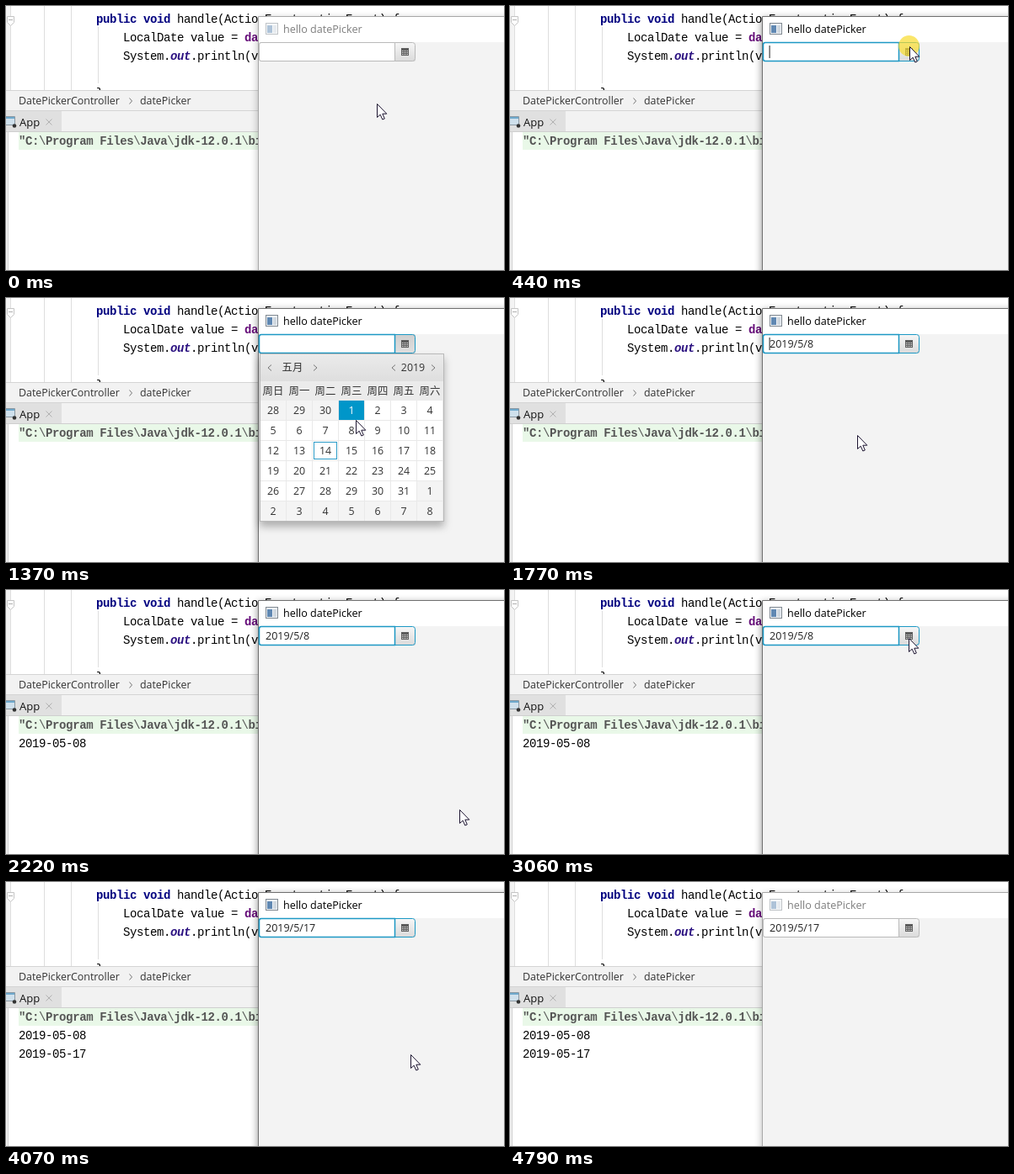
An HTML page for the animation above (4.94 s loop, 591x314 px).

```html
<!DOCTYPE html>
<html lang="en">
<head>
<meta charset="utf-8">
<title>Date picker demo</title>
<style>
  html, body { margin: 0; width: 100%; height: 100%; overflow: hidden; background: #fff; }
  svg { display: block; width: 591px; height: 314px; }
  text { font: 12.4px "Open Sans", "Noto Sans CJK SC", "Noto Sans CJK", sans-serif; fill: #333; white-space: pre; }
  .mono { font: 14px "Liberation Mono", monospace; letter-spacing: -.4px; fill: #000; }
  .keyword { font-weight: bold; fill: #000080; }
  .field { font-weight: bold; fill: #660e7a; }
  .static { font-style: italic; fill: #2a1080; }
  .command { font-weight: bold; fill: #555; }
  .slash { font-weight: normal; }
  .mid text, text.mid { text-anchor: middle; }
  .line { fill: none; stroke: #777; }
  .cell rect { fill: #fff; stroke: none; }
  .cell.outside rect { fill: #f4f4f4; }
  .cell.today rect + rect { fill: #fff; stroke: #2d9cc8; }
  .picked .cell.today rect + rect { stroke: #a0a0a0; }
  .cell.selected rect { fill: #0096c9; }
  .cell.selected rect + rect { fill: none; stroke: #35b2dc; }
  .cell.hover rect { fill: #0096c9; }
  .cell.hover rect + rect { stroke: none; fill: none; }
  .cell.hover text, .cell.selected text { fill: #fff; }
  #shadow { filter: blur(5px); }
  #popupBox { filter: drop-shadow(0 6px 5px rgba(0, 0, 0, .28)); }
</style>
</head>
<body>
<svg viewBox="0 0 591 314">
  <defs>
    <linearGradient id="raised" x2="0" y2="1"><stop offset="0" stop-color="#f7f7f7"/><stop offset="1" stop-color="#dadada"/></linearGradient>
    <linearGradient id="sunken" x2="0" y2="1"><stop offset="0" stop-color="#cfcfcf"/><stop offset="1" stop-color="#e0e0e0"/></linearGradient>
    <linearGradient id="head" x2="0" y2="1"><stop offset="0" stop-color="#ebebeb"/><stop offset="1" stop-color="#dedede"/></linearGradient>
  </defs>

  <!-- editor -->
  <rect width="5" height="101" fill="#f3f3f3"/>
  <path d="M5.5 0V101M45.5 0V101M77.5 0V101M109.5 25V92" stroke="#dedede"/>
  <path d="M1.5 12.5H9.5V19.5L5.5 23.5L1.5 19.5Z" fill="#fff" stroke="#c4c4c4"/>
  <path d="M3 16.5H8" stroke="#b0b0b0"/>
  <text class="mono" x="107" y="20"><tspan class="keyword">public void</tspan> handle(ActionEvent actionEvent) {</text>
  <text class="mono" x="139" y="42">LocalDate value = <tspan class="field">datePicker</tspan></text>
  <text class="mono" x="139" y="64">System.<tspan class="field static">out</tspan>.println(value</text>
  <text class="mono" x="107" y="108">}</text>

  <!-- breadcrumbs and tab bar -->
  <rect y="100" width="300" height="50" fill="#f2f2f2"/>
  <path d="M0 100.5H300M0 124.5H300" stroke="#d4d4d4"/>
  <text x="15" y="117">DatePickerController</text>
  <text x="159" y="117">datePicker</text>
  <path class="line" d="M146.5 109.5L149.5 113L146.5 116.5"/>
  <rect y="125" width="66" height="25" fill="#e0e0e0"/>
  <path d="M0 149.5H300" stroke="#cfcfcf"/>
  <path d="M-1 131.5H10.5V141.5H-1Z" fill="#cfe0ec" stroke="#8b98a3"/>
  <path d="M0 133H10" stroke="#6fa9cc" stroke-width="2"/>
  <circle cx="10" cy="142.5" r="2.3" fill="#333"/>
  <text x="16" y="142.5" style="font-size:13px;fill:#111">App</text>
  <path d="M47.5 134.5L54.5 141.5M54.5 134.5L47.5 141.5" stroke="#b0b0b0"/>

  <!-- console -->
  <rect y="150" width="3" height="164" fill="#f0f0f0"/>
  <path d="M2.5 150V314" stroke="#d0d0d0"/>
  <rect x="15" y="150" width="285" height="21" fill="#e9f8e8"/>
  <text class="mono command" id="command" x="15" y="164.5"></text>
  <text class="mono" id="out1" x="15" y="187">2019-05-08</text>
  <text class="mono" id="out2" x="15" y="209">2019-05-17</text>

  <!-- application window -->
  <rect id="shadow" x="299" y="15" width="330" height="340"/>
  <rect x="300" y="13" width="291" height="30" fill="#fff"/>
  <rect x="300" y="43" width="291" height="271" fill="#f3f3f3"/>
  <path id="frame" class="line" d="M591 12.5H299.5V314"/>
  <g id="title">
    <rect x="308.5" y="20.5" width="14" height="13" fill="#eef2f6" stroke="#808890"/>
    <rect x="310" y="23" width="6" height="9" fill="#6088b2"/>
    <rect x="317" y="23" width="4" height="9" fill="#d0d8e0"/>
    <text x="329" y="32" style="font-size:12.6px;fill:#000">hello datePicker</text>
  </g>
  <rect id="button" x="461" y="43" width="25" height="23" rx="2.5"/>
  <rect id="border" x="300.5" y="43.5" width="185" height="22" rx="3" fill="none"/>
  <path id="field" d="M303 43.5H461.5V65.5H303Q300.5 65.5 300.5 63V46Q300.5 43.5 303 43.5Z" fill="#fff"/>
  <g id="icon"><rect x="469" y="50" width="9" height="9" fill="#5c5c5c"/></g>
  <text id="value" x="308" y="59" style="font-size:12.5px;fill:#222"></text>
  <rect id="caret" x="307.5" y="47" width="1.2" height="15" fill="#444"/>

  <!-- calendar popup -->
  <g id="popup">
    <rect id="popupBox" x="301" y="66" width="219" height="200" fill="#b9b9b9"/>
    <rect x="302" y="67" width="217" height="32" fill="url(#head)"/>
    <rect x="302" y="99" width="217" height="23" fill="#ebebeb"/>
    <rect x="302" y="122" width="217" height="143" fill="#e9e9e9"/>
    <path class="line" d="M315 79.5L311 83L315 86.5M365 79.5L369 83L365 86.5M462 79.5L458 83L462 86.5M505 79.5L509 83L505 86.5"/>
    <text class="mid" x="340" y="87">五月</text>
    <text class="mid" x="483" y="87">2019</text>
    <g id="days" class="mid"></g>
  </g>

  <circle id="press" r="12.5" fill="#f8dc2c" opacity=".7"/>
  <path id="cursor" d="M.5 .5V16.5L4.2 13.2L6.8 19L9.3 18L6.8 12.2H11.8Z" fill="#fff" stroke="#1c1430"/>
</svg>

<script>
const LOOP = 4940;
const $ = id => document.getElementById(id);

function add(parent, tag, attrs, content = '') {
  const node = document.createElementNS('http://www.w3.org/2000/svg', tag);
  for (const name in attrs) node.setAttribute(name, attrs[name]);
  node.textContent = content;
  return parent.appendChild(node);
}

for (const char of '"C:\\Program Files\\Java\\jdk-12.0.1\\bin')
  add($('command'), 'tspan', char === '\\' ? { class: 'slash' } : {}, char);

for (let i = 0; i < 12; i++)
  add($('icon'), 'rect', { x: 470 + i % 4 * 2, y: 53 + (i >> 2) * 2, width: 1, height: 1, fill: '#f4f4f4' });

// Month grid: three leading days, 31 days of May, eight trailing days
const COL = 31, ROW = 24, GRID_X = 302, GRID_Y = 122;
[...'日一二三四五六'].forEach((day, i) =>
  add($('days'), 'text', { x: GRID_X + COL * i + 15, y: 115 }, '周' + day));

const cells = Array.from({ length: 42 }, (_, i) => {
  const x = GRID_X + i % 7 * COL, y = GRID_Y + Math.floor(i / 7) * ROW;
  const date = new Date(2019, 3, 28 + i), inMonth = date.getMonth() === 4;
  const today = inMonth && date.getDate() === 14;
  const cell = add($('days'), 'g', { class: 'cell' + (inMonth ? '' : ' outside') + (today ? ' today' : '') });
  add(cell, 'rect', { x, y, width: COL - 1, height: ROW - 1 });
  add(cell, 'rect', { x: x + 1.5, y: y + 1.5, width: COL - 4, height: ROW - 4 });
  add(cell, 'text', { x: x + 15, y: y + 16 }, date.getDate());
  return cell;
});
const EIGHTH = 10;

// The screen refreshes in bursts: [first, last, count]
const steps = [0, ...[
  [70, 440, 6], [610, 1080, 7], [1140, 1600, 7], [1770, 1770, 1], [1920, 2370, 7], [2450, 2910, 7],
  [2990, 3460, 7], [3540, 3770, 4], [3920, 4390, 7], [4470, 4470, 1], [4790, 4790, 1]
].flatMap(([first, last, count]) => Array.from({ length: count }, (_, i) =>
  Math.floor((first + (last - first) * i / Math.max(1, count - 1)) / 10) * 10))];

// Pointer path: [time, x, y]
const path = [
  [0, 440, 116], [140, 446, 104], [280, 468, 60], [360, 474, 48], [840, 474, 50], [1080, 467, 84],
  [1220, 440, 122], [1370, 415, 145], [1520, 412, 163], [1770, 412, 163], [1920, 430, 180],
  [2070, 535, 262], [2140, 550, 268], [2220, 538, 261], [2370, 533, 185], [2600, 498, 96],
  [2750, 480, 66], [2910, 474, 58], [3060, 473, 57], [3140, 474, 48], [3220, 473, 50],
  [3460, 445, 172], [3610, 457, 172], [3690, 466, 185], [3770, 470, 188], [3920, 470, 188],
  [4070, 480, 205], [4220, 515, 262], [4390, 540, 320]
];

function pointerAt(t) {
  const next = path.findIndex(key => key[0] > t);
  if (next < 0) return path[path.length - 1].slice(1);
  const [t0, x0, y0] = path[next - 1], [t1, x1, y1] = path[next];
  const k = (t - t0) / (t1 - t0);
  return [Math.round(x0 + (x1 - x0) * k), Math.round(y0 + (y1 - y0) * k)];
}

const within = (t, ...spans) => spans.some(([from, to]) => t >= from && t < to);
const show = (id, visible) => $(id).setAttribute('visibility', visible ? 'visible' : 'hidden');

function render(now) {
  const time = now % LOOP;
  const t = steps.findLast(step => step <= time);
  const [x, y] = pointerAt(t);
  const active = within(t, [360, 4790]);
  const open = within(t, [690, 1770], [3220, 3920]);
  const picked = t >= 1770;

  $('title').setAttribute('opacity', active ? 1 : .5);
  $('shadow').setAttribute('opacity', active ? .45 : .28);
  $('frame').style.stroke = active ? '#707070' : '#a8a8a8';
  for (const id of ['border', 'field']) $(id).setAttribute('stroke', active ? '#1c98c4' : '#bababa');
  $('field').setAttribute('stroke-width', active ? 1.5 : 1);
  $('button').setAttribute('fill', open ? 'url(#sunken)' : 'url(#raised)');
  $('value').textContent = t >= 3920 ? '2019/5/17' : picked ? '2019/5/8' : '';
  show('caret', active && (t < 440 || (t - 440) % 1000 < 500));
  show('out1', t >= 1920);
  show('out2', t >= 4000);

  show('popup', open);
  $('popup').classList.toggle('picked', picked);
  const col = Math.floor((x - GRID_X) / COL), row = Math.floor((y - GRID_Y) / ROW);
  cells.forEach((cell, i) => {
    cell.classList.toggle('hover', i === row * 7 + col && row >= 0);
    cell.classList.toggle('selected', picked && i === EIGHTH);
  });

  show('press', within(t, [360, 610], [1600, 1770], [3140, 3220], [3770, 3920]));
  $('press').setAttribute('transform', `translate(${x - .5} ${y - .5})`);
  $('cursor').setAttribute('transform', `translate(${x} ${y})`);
  requestAnimationFrame(() => render(performance.now()));
}
render(performance.now());
</script>
</body>
</html>
```
